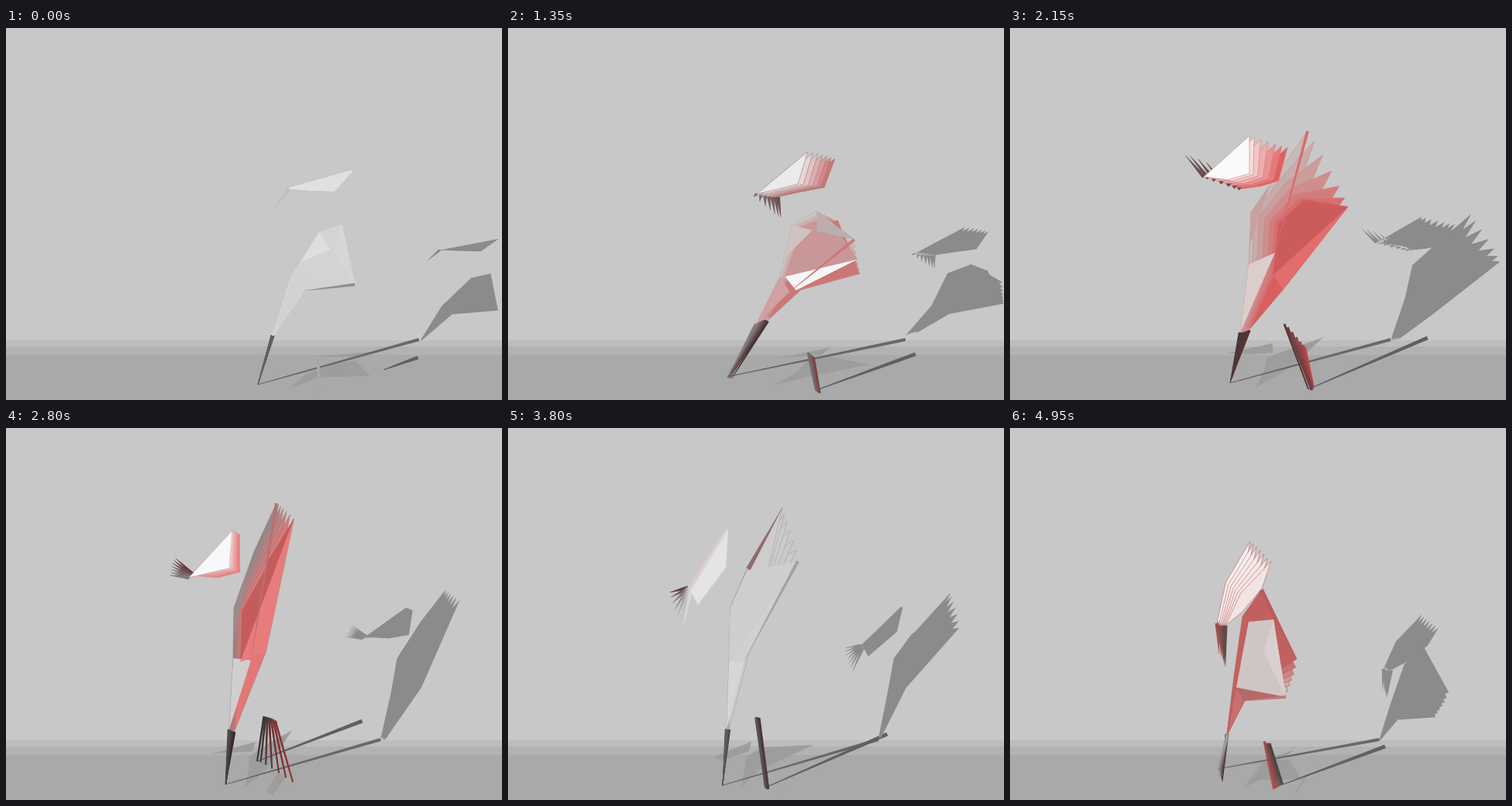
Animation, 640 px wide and 480 px high, one loop 5000 ms. Source, as an HTML page:

```html
<!DOCTYPE html>
<html lang="en">
<head>
<meta charset="utf-8">
<title>Folded paper walk</title>
<style>
html, body { margin: 0; width: 100%; height: 100%; overflow: hidden; background: #c8c8c8; }
svg { display: block; width: 100vw; height: 100vh; }
</style>
</head>
<body>
<svg id="stage" viewBox="0 0 640 480" preserveAspectRatio="none">
  <defs><clipPath id="wall"><rect width="640" height="403"/></clipPath></defs>
  <rect width="640" height="480" fill="#c8c8c8"/>
  <rect y="403" width="640" height="9" fill="#bdbdbd"/>
  <rect y="411" width="640" height="11" fill="#b2b2b2"/>
  <rect y="422" width="640" height="58" fill="#a9a9a9"/>
</svg>
<script>
const LOOP = 5000, STEP = 50, COPIES = 7, LAG = 80, TAIL = LAG * (COPIES - 1);
const stage = document.getElementById('stage');

const POSE = [250, 950, 1750, 2150, 2800, 3320, 3800, 4470, 4950];
const MAIN = POSE.filter((t, i) => i !== 5 && i !== 7);

// Left, tip, right, bottom
const head = [
  [365,207, 447,184, 424,210, 395,209],
  [345,218, 417,167, 404,205, 370,212],
  [291,206, 351,152, 340,196, 318,203],
  [250,192, 309,139, 309,188, 281,196],
  [236,193, 292,132, 288,181, 262,187],
  [232,206, 283,131, 280,178, 258,200],
  [236,210, 284,131, 281,180, 245,228],
  [267,252, 310,146, 300,198, 285,235],
  [278,255, 337,172, 325,207, 299,238]
];
// Hip, side, top, tip, low, foot
const body = [
  [368,322, 404,264, 431,255, 450,331, 385,339, 344,397],
  [361,321, 387,257, 420,247, 453,312, 376,338, 333,377],
  [336,318, 341,251, 372,220, 432,219, 350,335, 306,391],
  [308,305, 311,238, 345,188, 384,133, 342,290, 297,393],
  [293,297, 294,232, 320,160, 349,97, 316,300, 288,389],
  [289,300, 290,232, 310,182, 354,103, 308,300, 285,389],
  [285,302, 287,232, 308,185, 374,172, 304,302, 282,389],
  [289,320, 300,243, 324,209, 370,298, 310,335, 280,395],
  [292,335, 308,250, 340,247, 356,347, 302,352, 281,395]
];
const beakEnd = [
  [349,230], [349,243], [274,185], [226,164], [211,190], [209,212], [226,257], [270,292], [278,308]
];
const heel = [
  [325,460], [286,452], [287,450], [284,458], [283,460], [277,461], [277,461], [274,456], [268,440]
];
// Top and bottom of the far leg
const post = [
  [402,425, 405,470], [393,424, 402,471], [378,409, 391,464], [354,382, 385,466], [333,372, 324,430],
  [324,374, 336,464], [320,375, 332,464], [328,404, 340,466], [335,407, 352,460]
];

const hex = c => [1, 3, 5].map(i => parseInt(c.slice(i, i + 2), 16));
const ramp = text => text.split(' ').map(hex);
const pair = (fresh, old) => [ramp(fresh), ramp(old)];
const tints = {
  near: pair('#606060 #9a9a9a #6a5a5a #4a3838 #484848 #5a5a5a #a09a9a', '#606060 #3a2222 #504040 #5a3232 #3a2222 #5a3838 #3a2828'),
  far: pair('#a9a9a9 #777777 #666060 #5a3838 #363636 #555555 #484444', '#a9a9a9 #5a2a2a #a84848 #c04848 #8a3232 #502e2e #b85050'),
  body: pair('#d2d2d2 #d0cccc #c9bfbf #c4bcbc #8e8e8e #c8c8c8 #d8d0d0', '#d2d2d2 #cf8a88 #c76464 #d95e5e #e57676 #cfcccc #c26060'),
  beak: pair('#bfbfbf #858585 #686464 #6a5050 #7c7c7c #d8d8d8 #5c4a4a', '#bfbfbf #6b4a4a #7a5050 #6a4a4a #6a3535 #5a4040 #a05050'),
  head: pair('#e0e0e0 #e2e0e0 #f6f6f6 #fafafa #f8f8f8 #e4e4e4 #f2e4e4', '#e0e0e0 #c98784 #d26060 #e06060 #ec7a7a #d06868 #f4f0f0')
};
const rims = {
  head: ramp('#e6e6e6 #8a8080 #a87272 #d87474 #d89090 #dcdcdc #c45a5a'),
  body: ramp('#dcdcdc #c9a4a4 #c09c9c #cc8484 #a07070 #a0a0a0 #b85c5c')
};

const clamp = u => Math.min(1, Math.max(0, u));
const mix = (a, b, u) => a.map((v, i) => v + (b[i] - v) * u);
const rgb = c => `rgb(${c.map(Math.round).join()})`;

// Smooth curve through unevenly spaced rows, held at both ends
function curve(times, rows, t) {
  const last = times.length - 1;
  if (t <= times[0]) return rows[0];
  if (t >= times[last]) return rows[last];
  let i = 0;
  while (t >= times[i + 1]) i++;
  const span = times[i + 1] - times[i], u = (t - times[i]) / span;
  const slope = (k, j) => {
    const a = Math.max(0, k - 1), b = Math.min(last, k + 1);
    return (rows[b][j] - rows[a][j]) / (times[b] - times[a]) * span;
  };
  return rows[i].map((p, j) => {
    const d = rows[i + 1][j] - p, m = slope(i, j), n = slope(i + 1, j);
    return p + u * (m + u * (3 * d - 2 * m - n + u * (m + n - 2 * d)));
  });
}
// Straight blend between the main times
function blend(rows, t) {
  let i = 0;
  while (i < MAIN.length - 2 && t >= MAIN[i + 1]) i++;
  return mix(rows[i], rows[i + 1], clamp((t - MAIN[i]) / (MAIN[i + 1] - MAIN[i])));
}
const outline = p => {
  let d = '';
  for (let i = 0; i < p.length; i += 2) d += (i ? 'L' : 'M') + p[i].toFixed(1) + ' ' + p[i + 1].toFixed(1);
  return d + 'Z';
};
// Tapered strip from one point to another
function strip(x, y, X, Y, w, W) {
  const n = Math.hypot(X - x, Y - y) || 1, a = (y - Y) / n / 2, b = (X - x) / n / 2;
  return [x + a * w, y + b * w, X + a * W, Y + b * W, X - a * W, Y - b * W, x - a * w, y - b * w];
}

// Each part as a polygon at time t
const headAt = t => curve(POSE, head, t);
const bodyAt = t => curve(POSE, body, t);
const postAt = t => curve(POSE, post, t);
const parts = {
  near: t => strip(...bodyAt(t).slice(-2), ...curve(POSE, heel, t), 4.5, .8),
  far: t => strip(...postAt(t), 3, 2),
  body: bodyAt,
  beak: t => strip(...headAt(t).slice(0, 2), ...curve(POSE, beakEnd, t), 5, .4),
  head: t => {
    const p = headAt(t), bulge = 10 * clamp((t - 3800) / 600);
    return [p[0], p[1], (p[0] + p[2]) / 2 - bulge, (p[1] + p[3]) / 2, ...p.slice(2)];
  }
};

// Named corners of the body, and the folds spanned between them
function corners(t) {
  const p = bodyAt(t), c = {};
  ['hip', 'side', 'top', 'tip', 'low', 'foot'].forEach((n, i) => { c[n] = p.slice(2 * i, 2 * i + 2); });
  return c;
}
const lean = [[0], [0], [TAIL], [TAIL], [TAIL], [0], [0]];
const folds = [
  [c => [...c.hip, ...c.side, ...c.top, ...c.tip], '#d3d3d3 #cfcdcd #c26061 #cc5c5c #c45c5c #cecece #d0c5c5', true],
  [c => [...c.top, ...mix(c.side, c.tip, .4), ...c.tip], '#d6d6d6 #aaa4a4 #ccb8b8 #c9a8a8 #8e8888 #cecece #d8d0d0'],
  [c => [...c.side, ...mix(c.side, c.tip, .33), ...mix(c.side, c.hip, .65)], '#dedede #d2d0d0 #c9b4b4 #c8a0a0 #9a8c8c #cecece #d0c5c5'],
  [c => [...c.hip, ...c.low, ...c.foot], '#d2d2d2 #d9d5d5 #c96a6a #dccdcd #cfcfcf #d6d6d6 #c87070'],
  [c => [...c.hip, ...c.tip, ...c.low], '#d2d2d2 #f4f4f4 #fafafa #e36c6c #e87c7c #d0d0d0 #b56a6a', true],
  [c => strip(...c.low, ...c.tip, .5, 4), '#8e8e8e #cf8785 #c96a6a #dc6a6a #b87070 #a5a0a0 #c07878']
].map(([shape, text, leans]) => ({ shape, leans, tint: ramp(text) }));
const ridge = ramp('#d8d8d8 #c98c8a #c76464 #d95e5e #c45c5c #8e6c6c #b85c5c');

function add(fill = 'none') {
  const el = document.createElementNS('http://www.w3.org/2000/svg', 'path');
  el.setAttribute('fill', fill);
  stage.appendChild(el);
  return el;
}
const put = (el, pts, color) => {
  el.setAttribute('d', outline(pts));
  if (color) el.setAttribute('fill', rgb(color));
};
const many = n => Array.from({ length: n }, () => add());

const pool = add('#9d9d9d'), castNear = add('#686868'), castFar = add('#606060'), shade = add('#8b8b8b');
shade.setAttribute('clip-path', 'url(#wall)');
const els = { near: many(COPIES), far: many(COPIES), body: many(COPIES) };
const ridgeEl = add(), foldEls = many(folds.length);
els.beak = many(COPIES);
els.head = many(COPIES);

function drawSheets(t) {
  const rise = .63 + .03 * clamp((t - 2150) / 650), shift = 252 + 15 * clamp((t - 900) / 1200);
  const onWall = (p, dx) => p.map((v, i) => i % 2 ? 403 + rise * (v - 392) : .9 * v - .1 * p[i + 1] + dx);
  let cast = '';
  for (const name in parts) {
    const [fresh, old] = tints[name].map(r => blend(r, t));
    const rim = rims[name] && rgb(blend(rims[name], t));
    for (let k = 0; k < COPIES; k++) {
      const pts = parts[name](t - k * LAG);
      // The body stacks with its oldest sheet in front, the rest with the newest
      const el = els[name][name === 'body' ? k : COPIES - 1 - k];
      put(el, pts, mix(fresh, old, k / (COPIES - 1)));
      if (rim) {
        el.setAttribute('stroke', rim);
        el.setAttribute('stroke-width', .6);
      }
      if (name === 'body') cast += outline(onWall(pts, 263));
      else if (name === 'head' || name === 'beak') cast += outline(onWall(pts, shift));
    }
  }
  shade.setAttribute('d', cast);
}

function drawFolds(t) {
  const now = corners(t), back = corners(t - blend(lean, t)[0]), old = corners(t - TAIL);
  put(ridgeEl, strip(...old.top, ...old.tip, 6, .5), blend(ridge, t));
  folds.forEach((f, i) => put(foldEls[i], f.shape(f.leans ? back : now), blend(f.tint, t)));
}

function drawFloor(t) {
  const foot = corners(t).foot, [x, y] = curve(POSE, heel, t);
  put(castNear, strip(x, y, .9 * foot[0] - .1 * foot[1] + 263, 402, 1, 4));

  const [, top, px, py] = postAt(t), h = py - top;
  const end = [px + 95 + .7 * h, py - 20 - .55 * h];
  const from = mix([px, py], end, .65 * (1 - clamp((t - 250) / 500)));
  put(castFar, strip(...from, ...end, 1, 5));

  const flat = (p, dx, dy) => outline(p.map((v, i) => i % 2 ? dy + v / 4 : v + dx));
  const lift = clamp((466 - py) / 36) * clamp((t - 1750) / 400);
  pool.setAttribute('d', flat(bodyAt(t), 20, 366) + flat(headAt(t), 30, 372) +
    outline(strip(px + 16, 472, px + 32, 447, 10 * lift, 12 * lift)));
}

const start = performance.now();
function tick() {
  const t = Math.floor((performance.now() - start) % LOOP / STEP) * STEP;
  drawSheets(t);
  drawFolds(t);
  drawFloor(t);
  requestAnimationFrame(tick);
}
tick();
</script>
</body>
</html>
```
